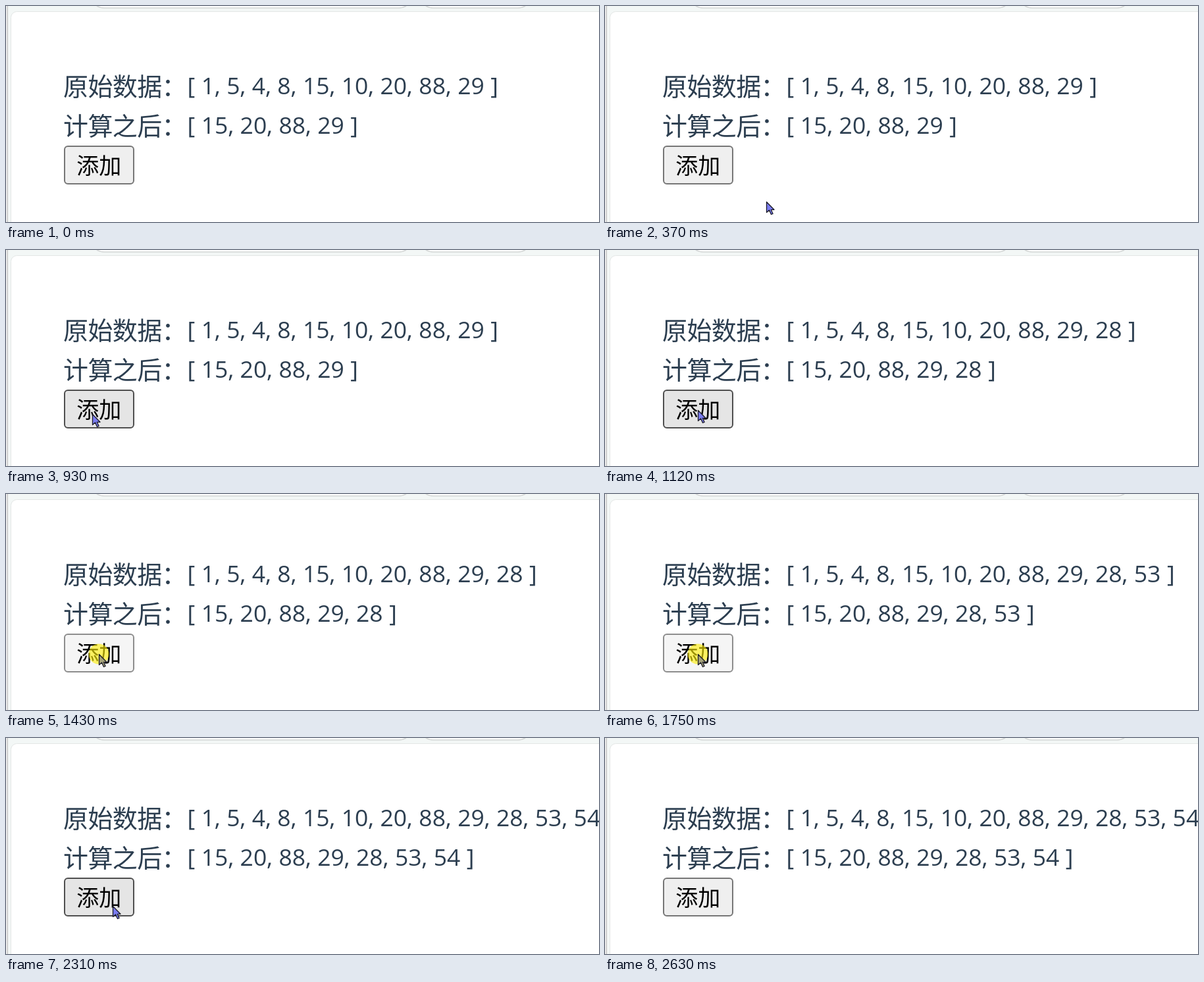
Recreate the animation shown at these times as an HTML page. Size 901 by 328 pixels, loop 3200 ms.

```html
<!DOCTYPE html>
<html lang="zh-CN">
<head>
<meta charset="utf-8">
<style>
  html, body { margin: 0; width: 100%; height: 100%; overflow: hidden; background: #f3f7f6; }
  svg { display: block; width: 901px; height: 328px; }
  .zh { font: 400 38px "Noto Sans CJK SC", "Noto Sans CJK", sans-serif; letter-spacing: -.6px; fill: #2c3e50; }
  .num { font: 400 35.5px "Open Sans", "Noto Sans", sans-serif; word-spacing: .3px; fill: #2c3e50; white-space: pre; }
  .label { font: 400 34px "Noto Sans CJK SC", "Noto Sans CJK", sans-serif; fill: #000; }
  .pill { fill: #fff; stroke: #d3d6d5; stroke-width: 1.5; }
  #btn { fill: #efefef; stroke: #767676; stroke-width: 2; }
  #cursor { fill: #7a7cf0; stroke: #1c1c28; stroke-width: 1.3; stroke-linejoin: round; }
  #glow { fill: #ffee00; fill-opacity: .6; visibility: hidden; }
  .hover #btn { fill: #e5e5e5; stroke: #4f4f4f; }
  .active #btn { fill: #f5f5f5; stroke: #8d8d8d; }
  .active #cursor { fill: #a5a27a; }
  .active #glow { visibility: visible; }
</style>
</head>
<body>
<svg id="stage" viewBox="0 0 901 328">
  <rect width="901" height="328" fill="#f3f7f6"/>
  <rect width="2" height="328" fill="#e9e9e9"/>
  <rect x="2" width="1" height="328" fill="#bfbfbf"/>
  <rect class="pill" x="129" y="-37" width="488" height="40" rx="20"/>
  <rect class="pill" x="629" y="-37" width="169" height="40" rx="20"/>
  <rect x="7.5" y="8.5" width="920" height="360" rx="9" fill="#fff" stroke="#e4e7e6"/>

  <text class="zh" x="87" y="135.5">原始数据：</text>
  <text class="num" id="all" x="275.6" y="134"></text>
  <text class="zh" x="87" y="195.5">计算之后：</text>
  <text class="num" id="big" x="275.6" y="194"></text>

  <rect id="btn" x="89" y="213" width="105" height="57" rx="5"/>
  <text class="label" x="141.2" y="255" text-anchor="middle">添加</text>

  <circle id="glow" cx="141" cy="243" r="15.5"/>
  <path id="cursor" d="M0 0V16L4 12.5L7 19L9.6 18L6.8 11.8H11.5Z"/>
</svg>
<script>
const LOOP = 3200, STEP = 60, HOLD = 60;
const [stage, cursor, all, big] = ['stage', 'cursor', 'all', 'big'].map(id => document.getElementById(id));

const linear = p => p;
const easeIn = p => p * p;
const easeOut = p => 1 - (1 - p) ** 3;

const enter = [379, 315], touch = [104, 223], dip = [120, 254], rest = [141, 243], exit = [882, 312];
const moves = [
  { at: 300, steps: 5, from: enter, to: touch, ease: easeOut },
  { at: 690, steps: 3, from: touch, to: dip, ease: linear },
  { at: 870, steps: 2, from: dip, to: rest, ease: linear },
  { at: 2200, steps: 6, from: rest, to: exit, ease: easeIn }
];
const clicks = [
  { at: 1060, value: 28 },
  { at: 1430, value: 53 },
  { at: 1750, value: 54 },
  { at: 1940, value: 7 }
];
const base = [1, 5, 4, 8, 15, 10, 20, 88, 29];

// The pointer advances in even ticks: x follows the easing, y is linear.
function pointer(t) {
  if (t < 300 || t >= 2630) return null;
  const { at, steps, from, to, ease } = moves.findLast(m => m.at <= t);
  const p = Math.min(1, Math.floor((t - at) / STEP) / steps);
  return [from[0] + (to[0] - from[0]) * ease(p), from[1] + (to[1] - from[1]) * p];
}

const inButton = ([x, y]) => x >= 88 && x <= 195 && y >= 212 && y <= 271;
const show = list => `[ ${list.join(', ')} ]`;

function draw(t) {
  const pos = pointer(t);
  const pressed = clicks.some(c => t >= c.at && t < c.at + HOLD);
  const list = base.concat(clicks.filter(c => t >= c.at + HOLD).map(c => c.value));

  all.textContent = show(list);
  big.textContent = show(list.filter(n => n > 10));
  stage.setAttribute('class', pressed ? 'active' : pos && inButton(pos) ? 'hover' : '');
  cursor.style.display = pos ? '' : 'none';
  if (pos) cursor.setAttribute('transform', `translate(${pos.map(v => Math.round(v) + .5)})`);
}

function tick() {
  draw(performance.now() % LOOP);
  requestAnimationFrame(tick);
}
tick();
</script>
</body>
</html>
```
